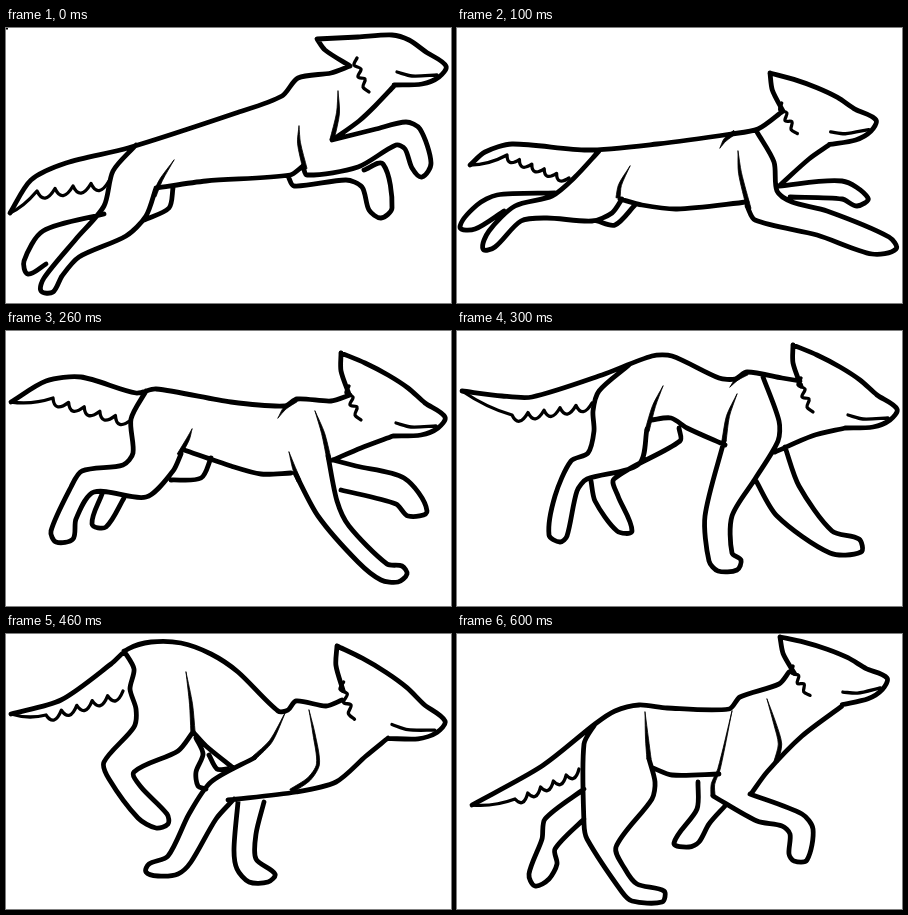
Recreate the animation shown at these times as an HTML page. Size 445 by 275 pixels, loop 700 ms.

```html
<!DOCTYPE html>
<html lang="en">
<head>
<meta charset="utf-8">
<title>Running dog</title>
<style>
  html, body { margin: 0; width: 100%; height: 100%; overflow: hidden; background: #fff; }
  svg { display: block; width: 445px; height: 275px; }
  path { fill: none; stroke: #000; stroke-linecap: round; stroke-linejoin: round; }
  #bold { stroke-width: 4.8; }
  #fine { stroke-width: 3.3; }
  #taper { fill: #000; stroke-width: .8; }
</style>
</head>
<body>
<svg viewBox="0 0 445 275">
  <rect id="speck" width="2" height="1.5"/>
  <path id="bold"/><path id="fine"/><path id="taper"/>
</svg>
<script>
const HOLD = 100;
let ink;

const parse = text => text.split(' ').map(pair => pair.split(',').map(Number));

// Soft curve through the points; handles follow the length of each segment.
function curve(points) {
  const at = i => points[Math.max(0, Math.min(points.length - 1, i))];
  const handle = (i, other) => {
    const [ax, ay] = at(i - 1), [bx, by] = at(i + 1), [x, y] = at(i), [ox, oy] = at(other);
    const reach = (other - i) * 0.27 * Math.hypot(ox - x, oy - y) / (Math.hypot(bx - ax, by - ay) || 1);
    return [x + (bx - ax) * reach, y + (by - ay) * reach];
  };
  return points.map((p, i) => i ? `C${handle(i - 1, i)} ${handle(i, i - 1)} ${p}` : `M${p}`).join('');
}

const line = text => { ink.bold += curve(parse(text)); };

// Stroke that grows from a thin start.
function swell(text) {
  const points = parse(text), last = points.length - 1;
  const edge = side => points.map(([x, y], i) => {
    const a = points[Math.max(0, i - 1)], b = points[Math.min(last, i + 1)];
    const dx = b[0] - a[0], dy = b[1] - a[1];
    const r = side * 2.1 * Math.sqrt(i / last) / Math.hypot(dx, dy);
    return [x - dy * r, y + dx * r];
  });
  ink.taper += curve(edge(1)) + curve(edge(-1).reverse()).replace('M', 'L') + 'Z';
}

// One head, turned and scaled so that it spans from ear tip to nose.
function head(earX, earY, noseX, noseY, flatEar = false) {
  const noseAt = [104, 64], size = noseAt[0] ** 2 + noseAt[1] ** 2;
  const dx = noseX - earX, dy = noseY - earY;
  const c = (dx * noseAt[0] + dy * noseAt[1]) / size, s = (dy * noseAt[0] - dx * noseAt[1]) / size;
  const place = (text, sx = 0, sy = 0) => curve(parse(text).map(([x, y]) =>
    [earX + c * (x + sx) - s * (y + sy), earY + s * (x + sx) + c * (y + sy)]));
  const brow = flatEar ? '-25,37 16,35 50,33 67,38' : '0,0 24,10 47,22 67,35';
  const ear = flatEar ? '-25,37 -17,48 8,64' : '0,0 0,18 8,41';
  ink.bold += place(brow + ' 84,50 104,64 97,75 80,82 52,83') + place(ear);
  ink.fine += place('55,70 70,74 95,73');
  ink.fine += place('8,33 5,40 12,44 9,52 16,54 14,62 20,67', flatEar ? 7 : 0, flatEar ? 23 : 0);
}

// Underside of the tail: a smooth tip, then a row of tufts.
function tail(tipX, tipY, x, y, rootX, rootY, tufts) {
  const dx = (rootX - x) / tufts, dy = (rootY - y) / tufts;
  ink.fine += `M${tipX} ${tipY}Q${(tipX + x) / 2} ${(tipY + y) / 2 + 5} ${x} ${y}`;
  for (let i = 0; i < tufts; i++) {
    ink.fine += `q${dx * 0.3 - dy * 0.8} ${dy * 0.3 + dx * 0.9} ${dx} ${dy}`;
  }
}

function leap() {
  head(336, -26, 440, 38, true);
  tail(4, 185, 31, 163, 103, 153, 4);
  line('388,58 369,78 353,93 328,111');
  line('344,38 325,45 292,50 276,68 230,85 122,120 60,135 25,152 4,185');
  line('130,117 107,143 98,178 70,211 38,250 35,263 47,264 56,248 73,229 120,208 140,188 150,160');
  line('150,160 200,153 284,147 297,138');
  line('98,186 37,203 18,233 22,246 40,236');
  line('167,160 163,180 138,192');
  line('326,112 370,101 400,94 414,101 425,135 416,149 406,140 399,121 390,117 352,139 301,147 297,138');
  line('282,148 288,158 340,152 356,159 363,182 375,190 386,180 377,136 358,142');
  swell('168,132 155,152 148,168');
  swell('293,98 293,115 299,141');
  swell('332,63 332,85 326,112');
}

function stretch() {
  head(313, 45, 419, 92);
  tail(13, 137, 50, 127, 112, 150, 5);
  line('372,117 352,131 322,158');
  line('326,83 301,101 274,106 200,116 130,122 55,116 28,124 13,137');
  line('142,123 118,149 95,168 58,178 32,203 26,221 38,219 64,193 90,190 135,193 155,185 165,171');
  line('163,171 185,177 220,181 290,174');
  line('98,165 40,167 20,177 3,199 18,201 47,183');
  line('178,177 158,197 140,193');
  line('300,104 317,134 320,163 335,174 370,183 432,209 439,221 415,226 360,207 298,192 290,178');
  line('322,158 385,153 411,170 400,178 385,171 333,169');
  swell('173,138 163,157 161,170');
  swell('281,123 283,145 292,181');
  swell('263,120 268,112 278,104');
}

function land() {
  head(335, 22, 439, 86);
  tail(5, 71, 47, 67, 125, 89, 5);
  line('387,105 355,117 327,129');
  line('344,64 325,70 291,68 279,75 225,71 150,58 130,62 75,46 40,50 5,71');
  line('140,60 125,88 127,122 117,134 76,140 65,156 45,200 50,211 67,208 70,188 88,161 140,166 167,140 175,123');
  line('178,119 225,135 255,143 285,142');
  line('205,127 195,147 165,149');
  line('96,163 86,193 100,196 118,167');
  line('289,142 312,185 352,231 375,249 392,251 401,243 396,235 381,233 343,195 331,170 322,125');
  line('327,129 350,135 398,147 421,180 402,185 390,173 335,159');
  swell('186,98 182,108 173,124');
  swell('283,121 288,137 293,150');
  swell('309,80 317,102 323,128');
  swell('272,87 279,77 290,69');
}

function stride() {
  head(336, 14, 440, 78);
  tail(5, 60, 55, 84, 135, 72, 5);
  line('388,97 355,105 318,121');
  line('343,50 325,47 290,41 278,48 262,47 215,25 195,25 145,44 75,66 45,65 5,60');
  line('172,34 142,60 136,80 137,100 131,122 114,130 98,165 92,204 103,211 110,205 120,160 130,148 182,133 190,98');
  line('194,89 214,87 230,97 268,114');
  line('222,97 223,110 157,148 161,165 175,200 160,200 138,170 134,150');
  line('267,110 248,185 252,230 261,240 280,239 284,229 275,222 275,185 298,148 321,110 322,90 306,46');
  line('298,148 320,185 373,222 404,221 402,208 375,200 342,155 328,116');
  swell('206,55 197,75 190,100');
  swell('280,63 271,85 267,110');
  swell('273,56 280,48 290,42');
}

function gather() {
  head(331, 12, 439, 87);
  tail(5, 80, 40, 81, 117, 57, 5);
  line('382,104 360,122 330,148 290,158 222,166');
  line('336,66 320,72 290,67 282,76 272,77 232,38 205,20 175,9 145,8 122,15 105,30 55,66 5,80');
  line('118,17 128,35 124,55 130,75 128,93 98,128 103,145 132,184 150,194 162,190 161,180 135,153 128,138 172,117 187,98');
  line('187,98 200,112 226,133');
  line('190,104 197,120 190,138 192,152 200,155');
  line('203,121 211,135 221,135');
  line('248,124 205,148 183,180 162,222 143,230 140,238 152,242 172,240 185,228 210,185 228,165');
  line('232,168 228,215 231,235 243,248 262,248 269,240 250,225 250,200 258,168');
  swell('180,38 185,70 187,98');
  swell('280,77 265,107 248,124');
  swell('303,76 308,100 312,130 303,145 285,157');
}

function tuck() {
  head(328, 3, 428, 56);
  tail(16, 122, 66, 116, 125, 85, 5);
  line('381,77 350,103 325,121 272,133');
  line('333,42 310,47 275,43 262,50 240,46 185,29 155,29 132,38 90,75 60,97 16,122');
  line('132,38 123,58 126,85 167,130 178,178 200,192 245,212 258,202 255,192 205,175 197,165 210,115 200,95');
  line('152,112 162,170 190,243 210,246 230,244 233,235 203,228 190,202');
  line('178,188 174,195 182,203 192,198');
  line('210,110 225,117 240,121 247,113');
  line('243,118 240,175 240,190');
  line('270,135 272,160 258,210 245,222 228,226 225,215 232,205');
  line('238,130 225,145 200,170');
  line('240,160 215,183');
  line('270,128 274,138 283,134');
  swell('179,48 185,70 200,95');
  swell('250,75 246,100 243,118');
  swell('302,48 313,70 310,90 298,108 270,133');
  swell('258,59 264,50 275,44');
}

function rise() {
  head(323, 3, 430, 44);
  tail(15, 171, 58, 165, 122, 135, 5);
  line('385,72 345,102 310,138 294,160');
  line('332,38 322,50 283,63 272,75 210,74 182,71 158,77 138,90 85,132 15,171');
  line('138,90 127,110 127,190 130,205 165,258 175,267 205,268 207,257 180,250 168,235 159,213 195,165 198,148 192,125');
  line('196,134 215,141 262,140');
  line('127,155 88,185 85,205 72,240 78,252 92,245 100,230 98,215 127,185');
  line('256,162 300,187 325,192 333,200 332,220 337,227 350,226 356,195 345,180 293,160');
  line('241,148 240,175 217,209 232,213 242,208 252,190 268,172');
  swell('188,78 190,105 192,125');
  swell('275,77 262,135 256,150 256,162');
  swell('310,65 318,90 323,110 319,128');
}

const drawings = [leap, stretch, land, stride, gather, tuck, rise].map(pose => {
  ink = { bold: '', fine: '', taper: '' };
  pose();
  return ink;
});
const byId = id => document.getElementById(id);

function render(time) {
  const index = Math.floor(time / HOLD) % drawings.length;
  for (const [id, d] of Object.entries(drawings[index])) byId(id).setAttribute('d', d);
  byId('speck').setAttribute('visibility', index ? 'hidden' : 'visible');
}

const start = performance.now();
function tick() {
  render(performance.now() - start);
  requestAnimationFrame(tick);
}
tick();
</script>
</body>
</html>
```
